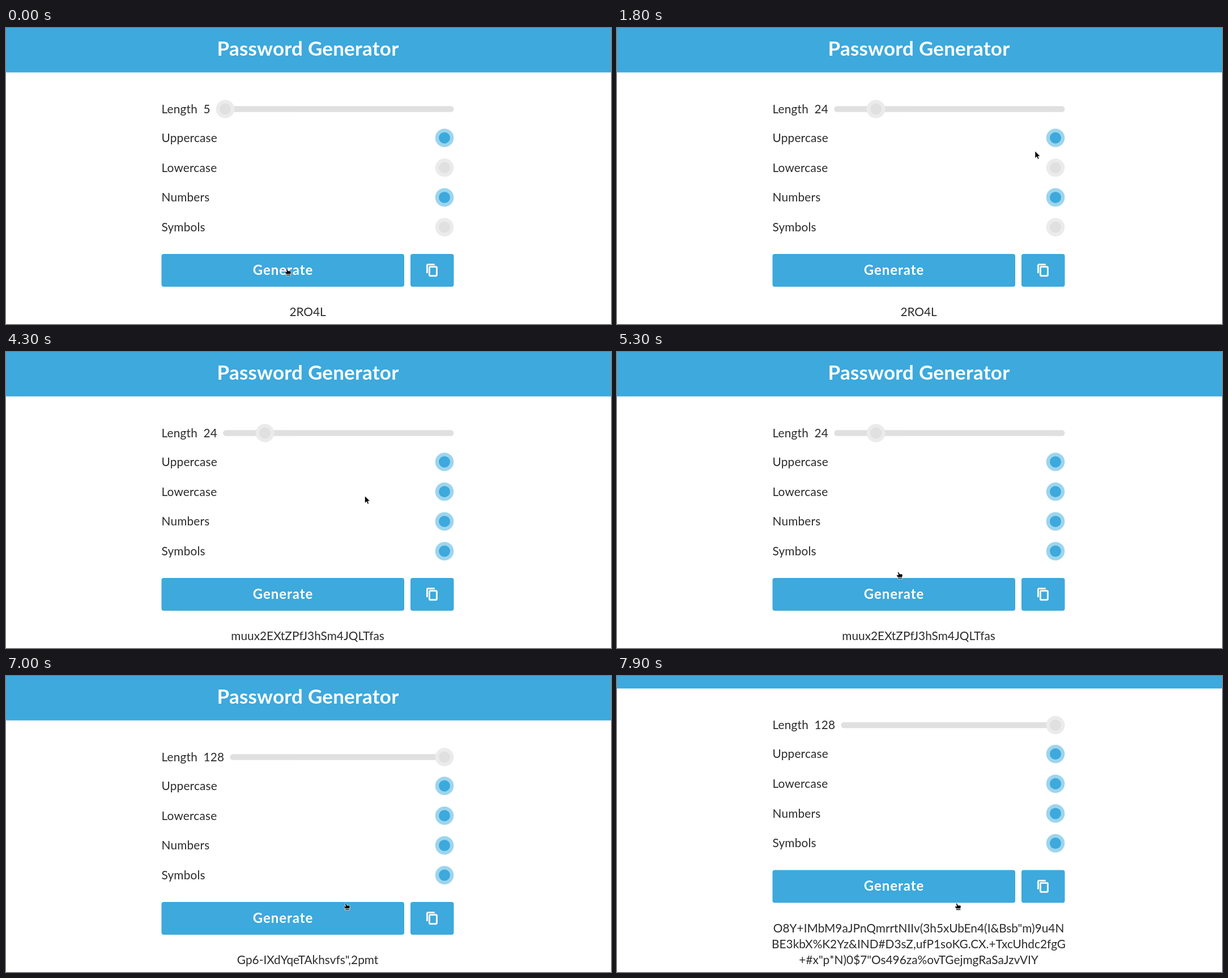
Write an HTML page that moves like this. It is 1068 px wide and 524 px high and loops after 8 s.

```html
<!DOCTYPE html>
<html lang="en">
<head>
<meta charset="utf-8">
<title>Password Generator</title>
<style>
  html, body { margin: 0; width: 100%; height: 100%; overflow: hidden; background: #fff; }
  svg { display: block; width: 1068px; height: 524px; --ring: #ebebeb; --dot: #e0e0e0; }
  text { font: 20.8px Lato, "Open Sans", sans-serif; letter-spacing: .2px; fill: #2b2b2b; white-space: pre; }
  .title, .action { font-weight: 700; fill: #fff; text-anchor: middle; }
  .title { font-size: 35px; letter-spacing: .2px; }
  .action { font-size: 24px; letter-spacing: .95px; }
  .password { text-anchor: middle; letter-spacing: .02px; }
  .blue { fill: #3da9dc; }
  .track { fill: #e0e0e0; }
  .ring { fill: var(--ring); }
  .dot { fill: var(--dot); }
  .on { --ring: #9dd5ed; --dot: #3da9dc; }
</style>
</head>
<body>
<svg viewBox="0 0 1068 524">
  <defs>
    <g id="knob"><circle class="ring" r="16.3"/><circle class="dot" r="10"/></g>
  </defs>
  <g id="page">
    <rect class="blue" width="1068" height="78.6"/>
    <text class="title" x="533" y="48.5">Password Generator</text>
    <text x="274.5" y="150.5">Length</text>
    <text id="count" x="348.5" y="150.5"></text>
    <rect id="track" class="track" y="138.2" height="10.6" rx="5.3"/>
    <use id="thumb" href="#knob"/>
    <g id="rows"></g>
    <rect class="blue" x="274.5" y="400" width="428.5" height="58" rx="4"/>
    <text class="action" x="489" y="436.5">Generate</text>
    <rect class="blue" x="714" y="400" width="76.5" height="58" rx="4"/>
    <path transform="translate(740.4 416.8)" fill="#fff" stroke="#fff" stroke-width=".8" d="M16 1H4c-1.1 0-2 .9-2 2v14h2V3h12zM19 5H8c-1.1 0-2 .9-2 2v14c0 1.1.9 2 2 2h11c1.1 0 2-.9 2-2V7c0-1.1-.9-2-2-2zm0 16H8V7h11z"/>
    <g id="password"></g>
  </g>
  <g id="cursor">
    <path id="arrow" d="M0 0V12.5L3 9.8L5 14.2L7 13.3L5.1 9H9Z" stroke="#fff" stroke-width=".6"/>
    <g id="hand" stroke="#fff" stroke-width=".8">
      <path d="M-2.5 1Q-2 -.3 -.4 .7L1 4H4.5Q6.3 4.3 6.2 6L5.5 10H-2.5L-4.5 6.5Q-4 5 -1.4 6Z"/>
      <path d="M-2.5 10.3H5.6V12.6H-2.5Z"/>
    </g>
  </g>
</svg>
<script>
const LOOP = 8000, STEP = 100, KNOB_X = 774, THUMB_Y = 143.5, BUTTON_Y = 400;
const $ = id => document.getElementById(id);
const place = (el, x, y) => el.setAttribute('transform', `translate(${x} ${y})`);

// Key points: [time, ...values]
const lengthKeys = [[0, 5], [900, 5], [1500, 24], [5900, 24], [6500, 128]];
const cursorKeys = [
  [0, 497, 426], [700, 392, 143],                       // to the slider
  [900, 392, 143], [1500, 461, 143], [1800, 738, 218],  // first drag
  [2000, 738, 218], [2300, 779, 240],                   // Lowercase
  [2400, 779, 240], [2600, 618, 404], [2800, 602, 422], // Generate
  [3300, 602, 422], [3900, 777, 346],                   // Symbols
  [4100, 777, 346], [4500, 490, 164], [4900, 498, 452], // Generate
  [5200, 498, 426], [5300, 498, 389], [5800, 458, 141], // to the slider
  [5900, 458, 141], [6500, 778, 143],                   // second drag
  [6800, 603, 392], [6900, 601, 402]                    // Generate
];
const passwords = [
  [0, '2RO4L'],
  [3300, 'muux2EXtZPfJ3hSm4JQLTfas'],
  [5400, 'Gp6-IXdYqeTAkhsvfs",2pmt'],
  [7500, 'O8Y+IMbM9aJPnQmrrtNIIv(3h5xUbEn4(I&Bsb"m)9u4N',
    'BE3kbX%K2Yz&IND#D3sZ,ufP1soKG.CX.+TxcUhdc2fgG',
    '+#x"p*N)0$7"Os496za%ovTGejmgRaSaJzvVIY']
];
const toggles = [['Uppercase', 0], ['Lowercase', 2500], ['Numbers', 0], ['Symbols', 4100]];
const rowY = i => 194.5 + 52.7 * i;

$('rows').innerHTML = toggles.map(([label], i) =>
  `<text x="274.5" y="${rowY(i) + 7.3}">${label}</text>
   <use href="#knob" x="${KNOB_X}" y="${rowY(i)}"/>`).join('');
const knobs = $('rows').querySelectorAll('use');

const smooth = p => p * p * (3 - 2 * p);

function glide(keys, t) {
  const next = keys.findIndex(([time]) => time > t);
  if (next < 0) return keys.at(-1).slice(1);
  if (next === 0) return keys[0].slice(1);
  const [t0, ...from] = keys[next - 1], [t1, ...to] = keys[next];
  const p = smooth((t - t0) / (t1 - t0));
  return from.map((v, i) => v + (to[i] - v) * p);
}

function stateAt(t) {
  const length = Math.round(glide(lengthKeys, t)[0]);
  const left = 371 + 12.2 * (String(length).length - 1);
  const thumb = left + 16 + (length - 5) / 123 * (KNOB_X - left - 16);
  const scroll = 56.5 * (Math.max(0, t - 7500) / 400) ** 3.36;
  return { length, left, thumb, scroll, cursor: glide(cursorKeys, t) };
}

function isOverControl({ thumb, scroll, cursor: [x, pointerY] }) {
  const y = pointerY + scroll;
  const near = (cx, cy) => Math.hypot(x - cx, y - cy) < 17;
  return near(thumb, THUMB_Y) || toggles.some((_, i) => near(KNOB_X, rowY(i))) ||
    (x > 274 && x < 703 && y >= BUTTON_Y && y < BUTTON_Y + 58);
}

const passwordMarkup = ([, ...lines]) => lines.map((line, i) =>
  `<text class="password" x="532.6" y="${510 + 28 * i}">${line.replaceAll('&', '&amp;')}</text>`).join('');

function draw(now) {
  const t = Math.floor(now % LOOP / STEP) * STEP;
  const { length, left, thumb, scroll, cursor } = stateAt(t);
  $('count').textContent = length;
  $('track').setAttribute('x', left);
  $('track').setAttribute('width', 790.5 - left);
  place($('thumb'), thumb, THUMB_Y);
  toggles.forEach(([, onAt], i) => knobs[i].classList.toggle('on', t >= onAt));
  $('password').innerHTML = passwordMarkup(passwords.findLast(([time]) => time <= t));
  place($('page'), 0, -scroll);

  // The pointer shape lags one step behind its position
  const hand = isOverControl(stateAt(t - STEP));
  place($('cursor'), ...cursor);
  $('hand').style.display = hand ? '' : 'none';
  $('arrow').style.display = hand ? 'none' : '';
}

let start;
function tick(now) {
  start ??= now;
  draw(now - start);
  requestAnimationFrame(tick);
}
draw(0);
requestAnimationFrame(tick);
</script>
</body>
</html>
```
